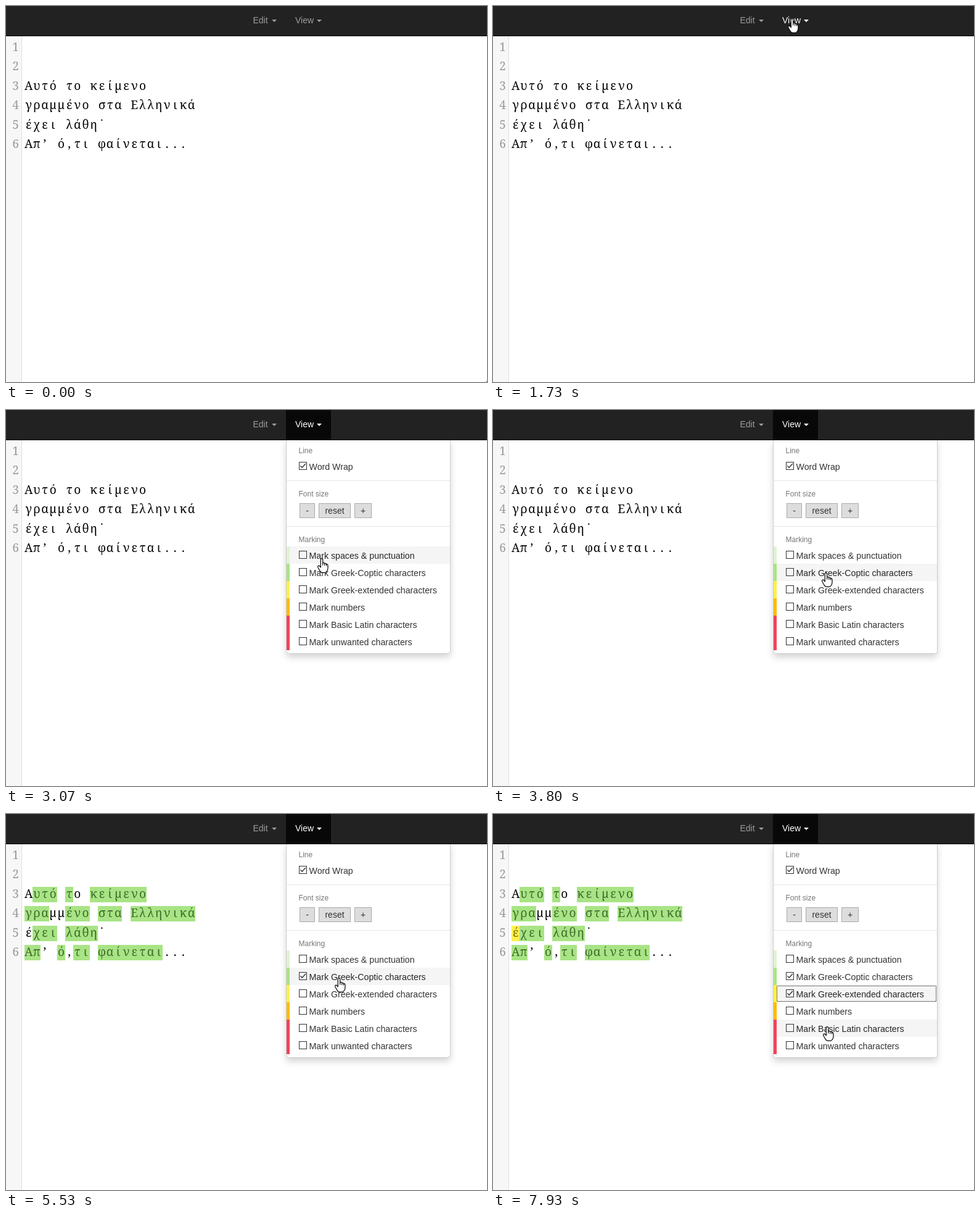
An HTML page with a canvas that plays this animation: 780 by 609 pixels, repeating every 8000 ms.

```html
<!DOCTYPE html>
<html lang="en">
<head>
<meta charset="utf-8">
<title>Greek text marking</title>
<style>
  html, body { margin: 0; width: 100%; height: 100%; overflow: hidden; background: #fff; }
  canvas { display: block; width: 780px; height: 609px; }
</style>
</head>
<body>
<canvas id="stage" width="780" height="609"></canvas>
<script>
const ctx = document.getElementById('stage').getContext('2d');
const LOOP = 8000;
const OPEN = 2070, MARK_GREEK = 4000, MARK_EXT = 6130;
const SANS = '"Liberation Sans", Arial, sans-serif';
const SLAB = '300 19px "Noto Serif", serif';
const CELL = 13.2, LINE = 31.43;
const GREEN = '#a8e485', YELLOW = '#fff04d';

// g: Greek-Coptic, e: Greek-extended, other: not marked
const lines = [
  ['', ''],
  ['', ''],
  ['Aυτό τo κείμενο', '-ggg g- ggggggg'],
  ['γραµµένο στα Ελληνικά', 'ggg--ggg ggg gggggggg'],
  ['έχει λάθη˙', 'eggg gggg-'],
  ['Απ’ ό,τι φαίνεται...', 'gg- g-gg gggggggg---']
];

const items = [
  ['Mark spaces & punctuation', '#dff3d2'],
  ['Mark Greek-Coptic characters', GREEN],
  ['Mark Greek-extended characters', YELLOW],
  ['Mark numbers', '#ffbb00'],
  ['Mark Basic Latin characters', '#f0435a'],
  ['Mark unwanted characters', '#f0435a']
];

// Pointer hotspot: time, x, y
const path = [
  [1000, 735, 262], [1730, 485, 20], [2470, 485, 20], [3070, 512, 240],
  [3330, 531, 261], [3530, 540, 266], [3800, 540, 263], [5470, 540, 263],
  [5530, 540, 265], [5730, 541, 292], [5930, 541, 293], [7800, 541, 293],
  [7930, 542, 344]
];

const hand = new Path2D('M-1.7 2.3Q-1.7 .6 0 .6Q1.7 .6 1.7 2.3V7.6' +
  'Q4.2 6.9 4.8 8.5Q7 8 7.6 9.7Q10 9.5 10 12V16Q10 19.5 8 21.5Q7 23.4 4.5 23.4H1.5' +
  'Q-1.5 23.4-3 20.5L-6 15.2Q-7 13.2-5.8 12.4Q-4.3 11.7-3 13.2L-1.7 14.8Z');
const knuckles = new Path2D('M1.7 7.6V11.5M4.8 8.5V12M7.6 9.7V12.5');
const arrow = new Path2D('M.5 .5V16.5L4.2 13L6.6 18.5L9 17.4L6.6 12.2H11.8Z');

function rect(x, y, w, h, color) {
  ctx.fillStyle = color;
  ctx.fillRect(x, y, w, h);
}

function text(str, x, y, color, size = 14, align = 'left') {
  ctx.font = `${size}px ${SANS}`;
  ctx.textAlign = align;
  ctx.fillStyle = color;
  ctx.fillText(str, x, y);
}

function frameRect(x, y, w, h, color) {
  ctx.strokeStyle = color;
  ctx.lineWidth = 1;
  ctx.strokeRect(x + .5, y + .5, w - 1, h - 1);
}

function pointerAt(t) {
  let i = 0;
  while (i < path.length - 2 && t >= path[i + 1][0]) i++;
  const [t0, x0, y0] = path[i], [t1, x1, y1] = path[i + 1];
  const k = Math.min(1, Math.max(0, (t - t0) / (t1 - t0)));
  const e = k * k * (3 - 2 * k);
  return { x: Math.round(x0 + (x1 - x0) * e), y: Math.round(y0 + (y1 - y0) * e) };
}

function drawEditor(t) {
  rect(0, 0, 780, 609, '#fff');
  rect(0, 49, 25, 560, '#f7f7f7');
  rect(25, 49, 1, 560, '#ddd');
  lines.forEach(([str, kinds], n) => {
    const base = Math.round(73 + LINE * n);
    const top = Math.round(55.14 + LINE * n);
    const marked = [...kinds].map(k =>
      k === 'g' && t >= MARK_GREEK ? GREEN : k === 'e' && t >= MARK_EXT ? YELLOW : null);
    marked.forEach((bg, i) => {
      if (!bg) return;
      const x = Math.round(30 + CELL * i);
      rect(x, top, Math.round(30 + CELL * (i + 1)) - x, 25, bg);
    });
    ctx.font = SLAB;
    ctx.textAlign = 'center';
    ctx.fillStyle = '#999';
    ctx.fillText(n + 1, 15.6, base);
    [...str].forEach((c, i) => {
      ctx.fillStyle = marked[i] === GREEN ? '#3d6a28' : marked[i] ? '#776a16' : '#000';
      ctx.fillText(c, 30 + CELL * (i + .5), base);
    });
  });
}

function drawTab(label, x, caretX, color) {
  text(label, x, 28, color);
  ctx.beginPath();
  ctx.moveTo(caretX, 22);
  ctx.lineTo(caretX + 8, 22);
  ctx.lineTo(caretX + 4, 26);
  ctx.fill();
}

function drawNav(open, hover) {
  rect(0, 0, 780, 48, '#222');
  rect(0, 48, 780, 1, '#080808');
  if (open) rect(454, 0, 73, 48, '#080808');
  drawTab('Edit', 400.5, 431, '#9d9d9d');
  drawTab('View', 469, 504, open || hover ? '#fff' : '#9d9d9d');
}

function drawCheck(y, on) {
  frameRect(475, y, 13, 13, '#333');
  if (!on) return;
  ctx.lineWidth = 1.4;
  ctx.beginPath();
  ctx.moveTo(477.3, y + 6.3);
  ctx.lineTo(480.2, y + 9.2);
  ctx.lineTo(486, y + 2.8);
  ctx.stroke();
}

function drawRow(label, top, on, active) {
  if (active) rect(460, top, 260, 28, '#f5f5f5');
  drawCheck(top + 7, on);
  text(label, 491.5, top + 20, active ? '#262626' : '#333', 14.2);
}

function drawButton(label, x, w) {
  rect(x, 151, w, 24, '#ddd');
  frameRect(x, 151, w, 24, '#aaa');
  text(label, x + w / 2, 168, '#333', 14, 'center');
}

function drawMenu(t, row, overWrap) {
  ctx.save();
  ctx.beginPath();
  ctx.rect(0, 49, 780, 560);
  ctx.clip();
  ctx.beginPath();
  ctx.roundRect(454.5, 47.5, 266, 347, [0, 0, 4, 4]);
  ctx.shadowColor = 'rgba(0,0,0,.175)';
  ctx.shadowBlur = 12;
  ctx.shadowOffsetY = 6;
  ctx.fillStyle = '#fff';
  ctx.fill();
  ctx.shadowColor = 'transparent';
  ctx.strokeStyle = '#ccc';
  ctx.lineWidth = 1;
  ctx.stroke();
  ctx.restore();

  text('Line', 474.5, 70, '#777', 12);
  drawRow('Word Wrap', 77, true, overWrap);
  rect(455, 114, 265, 1, '#e5e5e5');
  text('Font size', 474.5, 140, '#777', 12);
  drawButton('-', 476, 25);
  drawButton('reset', 507, 52);
  drawButton('+', 565, 28);
  rect(455, 188, 265, 1, '#e5e5e5');
  text('Marking', 474.5, 214, '#777', 12);

  const focus = t >= MARK_EXT ? 2 : t >= MARK_GREEK ? 1 : -1;
  items.forEach(([label, color], i) => {
    const top = 221 + 28 * i;
    const on = i === 1 && t >= MARK_GREEK || i === 2 && t >= MARK_EXT;
    drawRow(label, top, on, i === row || i === focus);
    rect(455, top, 5, 28, color);
    if (i === focus && i !== row) {
      ctx.setLineDash([1, 1]);
      ctx.lineDashOffset = .5;
      frameRect(460, top + 1, 259, 26, '#000');
      ctx.setLineDash([]);
    }
  });
}

function drawPointer({ x, y }, kind) {
  ctx.save();
  ctx.translate(x, y);
  ctx.lineJoin = 'round';
  ctx.strokeStyle = '#000';
  ctx.fillStyle = '#fff';
  if (kind === 'beam') {
    rect(0, -8, 1, 17, '#000');
    for (const end of [-8, 8]) {
      rect(-3, end, 3, 1, '#000');
      rect(1, end, 3, 1, '#000');
    }
  } else {
    const shape = kind === 'hand' ? hand : arrow;
    ctx.lineWidth = 1.2;
    ctx.fill(shape);
    ctx.stroke(shape);
    if (kind === 'hand') ctx.stroke(knuckles);
  }
  ctx.restore();
}

function draw(t) {
  // The screen refreshes 15 times a second
  const p = pointerAt(Math.floor((t + 4) * .015) / .015);
  const open = t >= OPEN, shown = t >= 1000;
  const overView = shown && p.y < 48 && p.x >= 454 && p.x < 527;
  const row = open && p.y >= 221 ? Math.floor((p.y - 221) / 28) : -1;
  const overWrap = open && p.y >= 77 && p.y < 105;

  drawEditor(t);
  drawNav(open, overView);
  if (open) drawMenu(t, row, overWrap);
  if (t < 470) rect(779, 608, 1, 1, '#000');
  if (shown) {
    const link = overView || overWrap || row >= 0;
    drawPointer(p, link ? 'hand' : open || p.y < 49 ? 'arrow' : 'beam');
  }
}

const start = performance.now();
function tick() {
  draw((performance.now() - start) % LOOP);
  requestAnimationFrame(tick);
}
tick();
</script>
</body>
</html>
```
